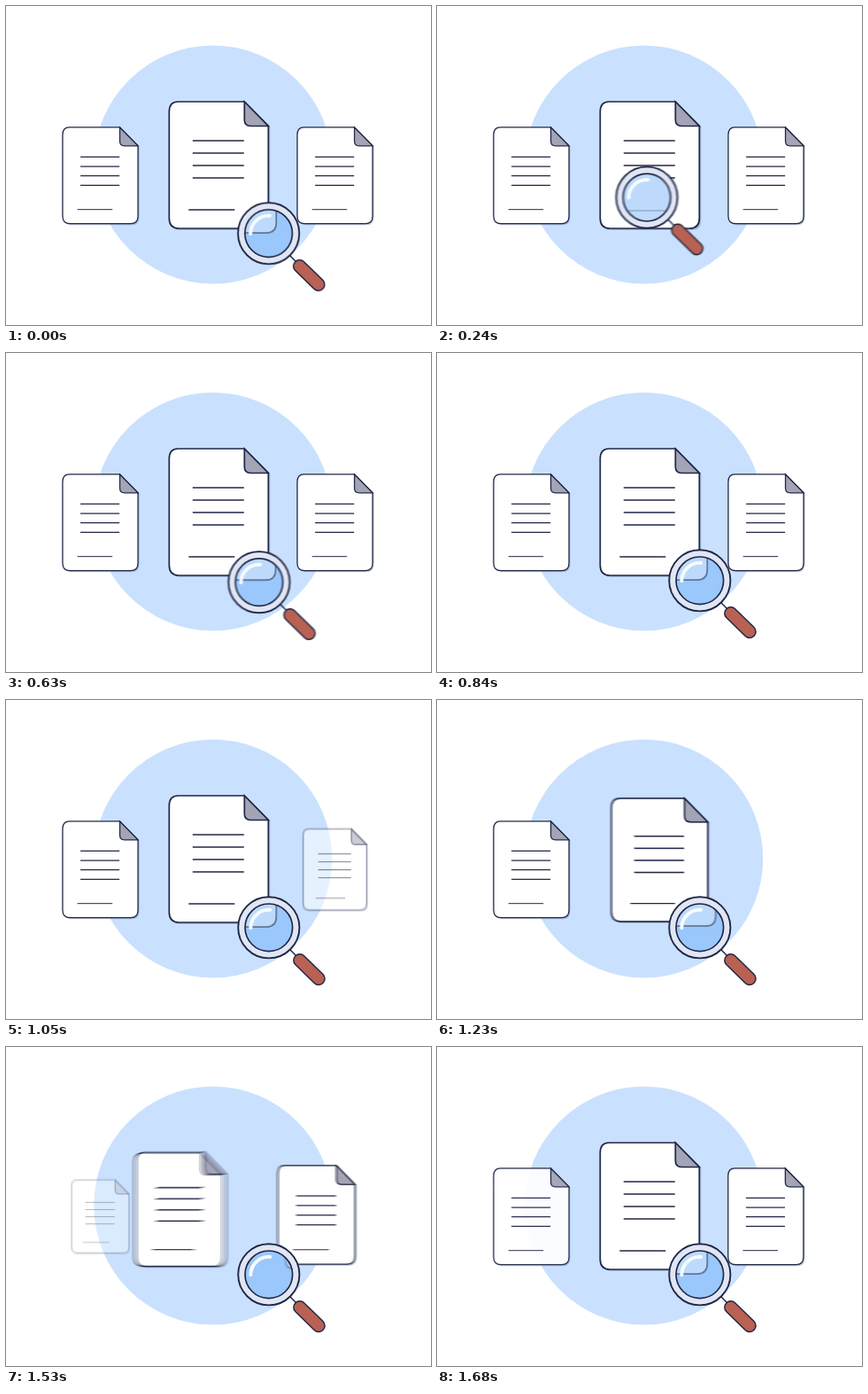
Write an HTML page with a canvas that moves like this. It is 480 by 360 pixels and loops after 1.71 s.

```html
<!DOCTYPE html>
<html lang="en">
<head>
<meta charset="utf-8">
<title>Document review</title>
<style>
html, body { margin: 0; width: 480px; height: 360px; overflow: hidden; background: #fff; }
canvas { display: block; }
</style>
</head>
<body>
<canvas id="stage" width="480" height="360"></canvas>
<script>
const stage = document.getElementById('stage').getContext('2d');
const ctx = stage.canvas.cloneNode().getContext('2d');
const LOOP = 1710, STEP = 30, TAU = Math.PI * 2;
const SHUTTER = 12, SAMPLES = 5;
const INK = '#202746', SIDE = 0.76;

const LEFT = { x: 106.5, y: 191.3 };
const MIDDLE = { x: 240.3, y: 179.5 };
const RIGHT = { x: 371.5, y: 191.3 };

// Lens centre every 120 ms
const LENS_PATH = [[296.8, 256.8], [272, 234], [237, 216], [224, 239], [245, 257], [280, 259], [296.8, 256.8]];
const LENS_END = 720;

const ramp = (t, a, b) => Math.min(1, Math.max(0, (t - a) / (b - a)));
const ease = u => u < 0.5 ? 2 * u * u : 1 - 2 * (1 - u) * (1 - u);
const mix = (a, b, u) => a + (b - a) * u;

// Carousel position: -1 left, 0 middle, 1 right
function pose(d) {
  const side = d < 0 ? LEFT : RIGHT, far = Math.abs(d);
  return {
    x: mix(MIDDLE.x, side.x, far),
    y: mix(MIDDLE.y, side.y, far),
    s: mix(SIDE, 1, (1 - far) ** 1.4)
  };
}

function spline(points, u) {
  const last = points.length - 1;
  const i = Math.min(Math.floor(u), last - 1), f = u - i;
  const at = k => points[Math.min(last, Math.max(0, k))];
  return [0, 1].map(d => {
    const [a, b, c, e] = [at(i - 1)[d], at(i)[d], at(i + 1)[d], at(i + 2)[d]];
    return b + 0.5 * f * (c - a + f * (2 * a - 5 * b + 4 * c - e + f * (3 * (b - c) + e - a)));
  });
}

function paint(path, fill, stroke, width) {
  if (fill) { ctx.fillStyle = fill; ctx.fill(path); }
  if (stroke) { ctx.strokeStyle = stroke; ctx.lineWidth = width; ctx.stroke(path); }
}

function disc(x, y, r, fill, stroke, width) {
  const path = new Path2D();
  path.arc(x, y, r, 0, TAU);
  paint(path, fill, stroke, width);
}

function line(x1, y1, x2, y2, color, width) {
  const path = new Path2D();
  path.moveTo(x1, y1);
  path.lineTo(x2, y2);
  paint(path, null, color, width);
}

// Page shapes are centred on the origin
const SHEET = new Path2D('M-46-71.5H29L56-44V60Q56 71.5 45 71.5H-45Q-56 71.5-56 60V-60Q-56-71.5-46-71.5Z');
const FOLD = new Path2D('M29-71.5L56-44H36Q29-44 29-51Z');
const OUTSIDE = new Path2D(SHEET);
OUTSIDE.rect(-80, -100, 160, 200);

function page({ x, y, s }, alpha = 1) {
  ctx.save();
  ctx.globalAlpha = alpha;
  ctx.translate(x, y);
  ctx.scale(s, s);
  ctx.save();
  ctx.clip(OUTSIDE, 'evenodd');
  ctx.translate(2, 2);
  paint(SHEET, 'rgba(95, 115, 155, 0.4)');
  ctx.restore();
  paint(SHEET, '#fff', INK, 1.7);
  paint(FOLD, '#a3a4b6', INK, 1.7);
  for (let i = 0; i < 4; i++) line(-29.5, -27.5 + i * 14, 28.5, -27.5 + i * 14, INK, 1.6);
  line(-34, 50.5, 18, 50.5, INK, 1.3);
  ctx.restore();
}

// Pale refracted copy seen through the glass
function refracted({ x, y, s }, lx, ly) {
  ctx.save();
  ctx.translate(x + 5 + (lx - 237) / 15, y + 1 + (ly - 216) / 10);
  ctx.scale(s, s);
  paint(SHEET, 'rgba(225, 238, 253, 0.5)', '#63789b', 1.8);
  line(-34, 50.5, 18, 50.5, '#8295b4', 1.1);
  ctx.restore();
}

function magnifier(x, y, pages) {
  ctx.save();
  ctx.lineCap = 'round';
  line(x + 24, y + 25, x + 31, y + 32, INK, 1.5);
  line(x + 35, y + 37, x + 56.3, y + 57.7, INK, 15.4);
  line(x + 35, y + 37, x + 56.3, y + 57.7, '#b96153', 12.4);
  disc(x, y, 34.6, '#e0e6f3', INK, 1.9);
  disc(x, y, 26.8, '#9ac8fc');
  ctx.save();
  const glass = new Path2D();
  glass.arc(x, y, 26.8, 0, TAU);
  ctx.clip(glass);
  pages.forEach(p => refracted(p, x, y));
  ctx.restore();
  const shine = new Path2D();
  shine.arc(x, y + 0.5, 20.5, Math.PI, Math.PI * 1.52);
  paint(shine, null, '#f7fbff', 4);
  disc(x, y, 26.8, null, INK, 1.7);
  ctx.restore();
}

function scene(t) {
  ctx.fillStyle = '#fff';
  ctx.fillRect(0, 0, 480, 360);
  disc(233.7, 179, 134.5, '#c9e1fe');

  const leave = ramp(t, 930, 1200);
  const enter = ramp(t, 1410, 1680);
  const first = pose(ease(ramp(t, 1110, 1695)));
  const next = pose(ease(ramp(t, 1310, 1680)) - 1);

  page({ ...RIGHT, s: SIDE * mix(1, 0.6, ease(leave)) }, 1 - leave);
  page({ ...LEFT, s: SIDE * mix(0.6, 1, ease(enter)) }, ramp(t, 1440, 1695));
  page(next);
  page(first);

  const [lx, ly] = spline(LENS_PATH, Math.min(t, LENS_END) / 120);
  magnifier(lx, ly, [next, first]);
}

// Average several moments for motion blur
function draw(t) {
  for (let i = 0; i < SAMPLES; i++) {
    scene(Math.max(0, t + SHUTTER * (i / (SAMPLES - 1) - 0.5)));
    stage.globalAlpha = 1 / (i + 1);
    stage.drawImage(ctx.canvas, 0, 0);
  }
}

const start = performance.now();
function tick() {
  const t = (performance.now() - start) % LOOP;
  draw(Math.floor(t / STEP) * STEP);
  requestAnimationFrame(tick);
}
tick();
</script>
</body>
</html>
```
